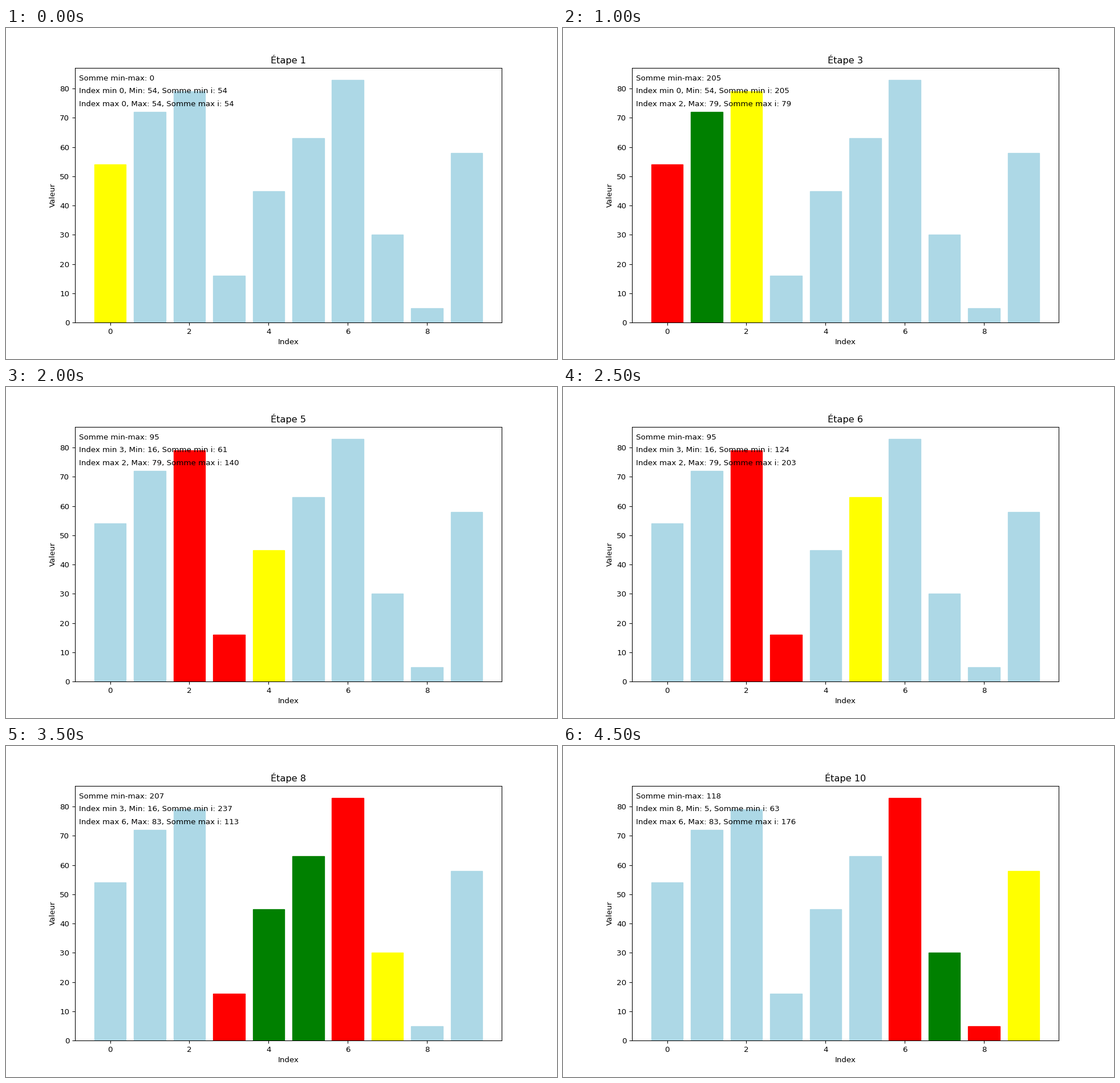
A matplotlib script that plays this animation: 966 by 580 pixels, repeating every 5 s.

```python
import matplotlib.pyplot as plt
from matplotlib.animation import FuncAnimation

VALUES = [54, 72, 79, 16, 45, 63, 83, 30, 5, 58]
WIDTH, HEIGHT, DPI = 966, 580, 96.6
EPS = 1e-3  # keeps the pixel size from being truncated downwards


def scan(last):
    """Follow the running extremes and partial sums up to index `last`."""
    lo = hi = 0
    lo_sum = hi_sum = VALUES[0]
    best = 0
    for i in range(1, last + 1):
        v = VALUES[i]
        lo_sum += v
        hi_sum += v
        if v > VALUES[hi]:
            hi, hi_sum, best = i, v, lo_sum
        elif v < VALUES[lo]:
            lo, lo_sum, best = i, v, hi_sum
    return lo, hi, lo_sum, hi_sum, best


def bar_color(i, step, lo, hi):
    if i == step:
        return "yellow"
    if i in (lo, hi):
        return "red"
    if min(lo, hi) < i < max(lo, hi):
        return "green"
    return "lightblue"


plt.rcParams["font.family"] = "DejaVu Sans"
fig, ax = plt.subplots(figsize=((WIDTH + EPS) / DPI, (HEIGHT + EPS) / DPI), dpi=DPI)
bars = ax.bar(range(len(VALUES)), VALUES, color="lightblue")
ax.set_xlabel("Index")
ax.set_ylabel("Valeur")
title = ax.set_title("")
lines = [ax.text(0.01, y, "", transform=ax.transAxes) for y in (0.95, 0.90, 0.85)]


def update(step):
    lo, hi, lo_sum, hi_sum, best = scan(step)
    for i, bar in enumerate(bars):
        bar.set_color(bar_color(i, step, lo, hi))
    title.set_text(f"Étape {step + 1}")
    lines[0].set_text(f"Somme min-max: {best}")
    lines[1].set_text(f"Index min {lo}, Min: {VALUES[lo]}, Somme min i: {lo_sum}")
    lines[2].set_text(f"Index max {hi}, Max: {VALUES[hi]}, Somme max i: {hi_sum}")
    return [*bars, title, *lines]


anim = FuncAnimation(fig, update, frames=len(VALUES), interval=500,
                     init_func=lambda: update(0), repeat=True, repeat_delay=0)
plt.show()
```
